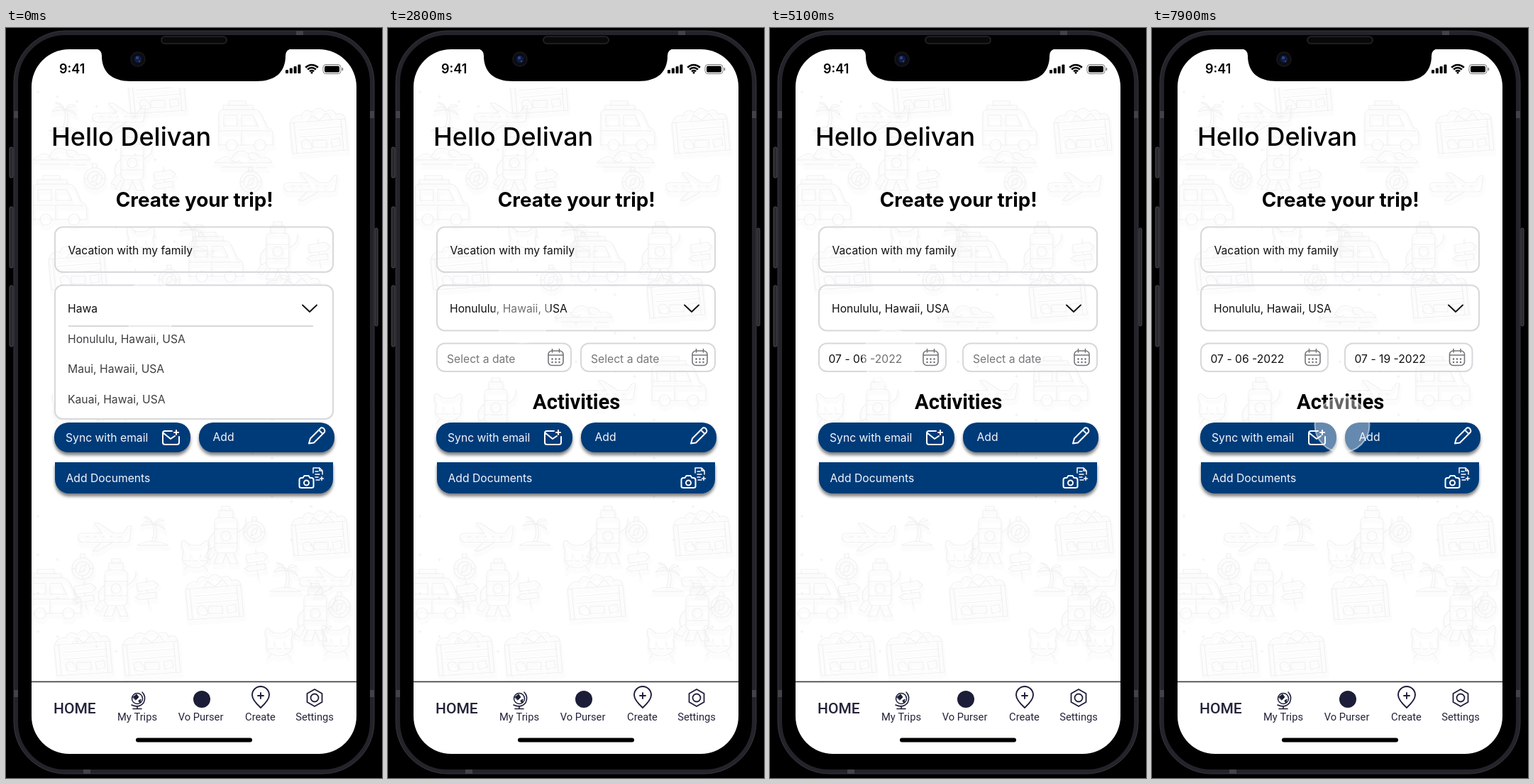
An HTML page with a canvas that plays this animation: 530 px wide and 1057 px high, repeating every 8 s.

```html
<!DOCTYPE html>
<html lang="en">
<head>
<meta charset="utf-8">
<title>Create your trip</title>
<style>
html, body { margin: 0; width: 530px; height: 1057px; overflow: hidden; background: #000; }
canvas { display: block; }
</style>
</head>
<body>
<canvas id="stage" width="530" height="1057"></canvas>
<script>
const W = 530, H = 1057, LOOP = 8000, STEP = 100;
const BLUE = '#003b79', NAVY = '#1c1d38', BORDER = '#d8d8dc';
let ctx;

const clamp = v => Math.min(1, Math.max(0, v));
const mix = (a, b, p) => a + (b - a) * p;
const progress = (t, start, length) => clamp((t - start) / length);
const easeOut = p => 1 - Math.pow(1 - p, 1.7);
const easeInOut = p => p * p * (3 - 2 * p);

function box(x, y, w, h, r, fill, stroke, width = 2) {
  ctx.beginPath();
  ctx.roundRect(x, y, w, h, r);
  paint(fill, stroke, width);
}

function circle(x, y, r, fill, stroke, width = 2) {
  ctx.beginPath();
  ctx.arc(x, y, r, 0, Math.PI * 2);
  paint(fill, stroke, width);
}

function paint(fill, stroke, width) {
  if (fill) { ctx.fillStyle = fill; ctx.fill(); }
  if (stroke) { ctx.strokeStyle = stroke; ctx.lineWidth = width; ctx.stroke(); }
}

function path(d, x, y, stroke, width = 2, fill) {
  ctx.save();
  ctx.translate(x, y);
  ctx.lineCap = ctx.lineJoin = 'round';
  const shape = new Path2D(d);
  if (fill) { ctx.fillStyle = fill; ctx.fill(shape); }
  if (stroke) { ctx.strokeStyle = stroke; ctx.lineWidth = width; ctx.stroke(shape); }
  ctx.restore();
}

function text(s, x, y, color = '#111', font = '15.7px Inter', align = 'left') {
  ctx.font = font + ', sans-serif';
  ctx.textAlign = align;
  ctx.fillStyle = color;
  ctx.fillText(s, x, y);
}

function faded(alpha, draw) {
  if (alpha <= 0) return;
  ctx.save();
  ctx.globalAlpha = alpha;
  draw();
  ctx.restore();
}

// Line drawings of the wallpaper, each around its own centre
const DOODLES = {
  van: 'M-38 25V-18Q-38 -25 -30 -25H12Q20 -25 24 -14L30 0Q38 2 38 10V25H28M-38 25H-28M-12 25H12M-31 -17H-12V-2H-31ZM-6 -17H10L17 -2H-6ZM-38 5H34M-28 25a8 8 0 1 0 16 0a8 8 0 1 0 -16 0M12 25a8 8 0 1 0 16 0a8 8 0 1 0 -16 0M-32 -25V-31H10V-25M-24 -31V-37H0V-31M-6 5V25',
  plane: 'M-36 4Q-38 -4 -30 -4H-2L-14 -18H-7L14 -4H27L34 -14H39L36 6Q35 9 28 9H-28Q-34 9 -36 4ZM-4 9L-16 21H-8L12 9M-26 1H-21M-14 1H-10M-3 1H1M8 1H12M20 1H24',
  bag: 'M-40 -14L38 -20L42 24L-36 29ZM-34 -15L-30 28M32 -19L36 24M-40 -14Q-35 -27 -24 -24Q-20 -36 -8 -29Q0 -40 10 -30Q22 -36 25 -26Q36 -30 38 -20M-28 -4L34 -9M-27 6L35 1M-15 -16L-9 -25L2 -18L12 -28L20 -19M-8 10H12V20H-8ZM-24 13q8 -9 14 2t-12 6zM18 10l12 -3l2 10l-12 3z',
  hiker: 'M-16 -18Q-17 -26 -9 -26H9Q17 -26 16 -18V16Q16 24 8 24H-8Q-16 24 -16 16ZM-10 -26V-36H10V-26M-6 -36V-42H6V-36M-16 -10H16M-16 10H16M-7 0a7 7 0 1 0 14 0a7 7 0 1 0 -14 0M-16 -5Q-29 5 -23 19L-16 15M16 -5Q30 -12 28 -25M-11 24L-17 39H-5L0 25M0 25L6 39H17L11 24M-24 20l-6 9l8 4l6 -9',
  globe: 'M-15 0a15 15 0 1 0 30 0a15 15 0 1 0 -30 0M-10 0a10 10 0 1 0 20 0a10 10 0 1 0 -20 0M-3 -15V-21H3V-15M5 -6L2 3L-5 6L-2 -3ZM-15 0H-11M11 0H15M0 11V15',
  palm: 'M-22 19Q0 8 22 19ZM-2 14Q4 1 0 -10M3 13Q8 0 3 -10M1 -10Q-7 -20 -17 -8Q-7 -12 1 -10Q-4 -23 -13 -21Q-4 -18 1 -10Q8 -23 16 -16Q8 -16 1 -10Q13 -13 17 -3Q10 -9 1 -10',
  sign: 'M-14 -9L10 -13L17 -7L12 -1L-12 2ZM-10 6L13 3L14 11L-9 14L-16 10ZM0 -12V-18M1 0V5M2 13L4 23',
  isle: 'M-40 8Q-26 -5 -16 2Q-8 -15 8 -5Q17 -9 25 1Q36 -2 41 8ZM-30 14H12M18 15H34M-18 3Q-10 10 -4 4M8 -4Q7 5 18 4',
  cat: 'M-17 -4Q-23 -19 -16 -20L-7 -13H7L16 -20Q22 -18 17 -4Q22 12 9 17Q0 21 -9 17Q-22 12 -17 -4ZM-7 -1v4M7 -1v4M-3 8Q0 11 3 8M-16 9L-7 9M16 9L7 9M-12 17L-17 23M12 17L17 23'
};
const PLACES = {
  van: [[338, 140], [76, 245], [296, 325], [68, 800], [410, 500]],
  plane: [[158, 124], [428, 222], [138, 716], [450, 778], [310, 515]],
  bag: [[440, 148], [212, 92], [100, 340], [405, 380], [442, 715], [293, 805], [108, 884], [204, 884]],
  hiker: [[178, 190], [383, 315], [310, 716], [436, 825], [155, 790], [152, 535]],
  globe: [[108, 762], [350, 710], [470, 816], [125, 212], [345, 217], [230, 355]],
  palm: [[207, 710], [394, 775], [82, 126], [262, 295]],
  sign: [[198, 792], [352, 752], [110, 796], [222, 213], [440, 315]],
  isle: [[334, 182], [78, 178], [275, 400]],
  cat: [[267, 742], [385, 866], [465, 862], [190, 300], [85, 535]]
};

function drawWallpaper() {
  for (const [kind, spots] of Object.entries(PLACES))
    for (const [x, y] of spots) {
      path(DOODLES[kind], x + 1, y + 5, 'rgba(0,0,0,.012)', 6);
      path(DOODLES[kind], x, y, '#f0f0f1', 1.1);
    }
  for (let i = 0; i < 70; i++) {
    const x = 45 + (i * 137.5) % 440, y = 90 + (i * 251.3) % 815;
    path('M-2 0H2M0 -2V2', x, y, '#f1f1f2', 1);
  }
}

function drawPhone() {
  ctx.fillStyle = '#000';
  ctx.fillRect(0, 0, W, H);
  for (const [y, h] of [[168, 43], [252, 86], [363, 86]]) box(5, y, 5, h, 2, '#29292d', '#4a4a50', 1);
  box(520, 282, 4, 138, 2, '#29292d', '#4a4a50', 1);
  box(14, 7, 502, 1041, 70, '#000', '#24232a', 6);
  box(11, 4, 508, 1047, 73, null, '#38373e', 1);
  ctx.fillStyle = '#434249';
  for (const y of [117, 933]) {
    ctx.fillRect(11, y, 6, 10);
    ctx.fillRect(513, y, 6, 10);
  }
  ctx.fillRect(409, 4, 10, 6);
  ctx.fillRect(109, 1045, 10, 6);
  box(36, 30, 458, 993, 53, '#fff');
  box(219, 12, 92, 10, 5, '#09090a', '#27272a', 1.5);
}

function drawNotch() {
  path('M125 29Q135 30 135 39C135 62 149 75 176 75H353C380 75 394 62 394 39Q394 30 404 29Z', 0, 0, null, 0, '#000');
  circle(186, 44, 10, '#0c0d13', '#17181e', 1.5);
  circle(186, 44, 5, '#121c49');
  circle(185, 42, 2.2, '#2d4580');
  circle(188, 47, 1.3, '#284d73');
}

function drawStatus() {
  text('9:41', 75, 64, '#000', '600 18px Inter');
  for (let i = 0; i < 4; i++) {
    const h = 5 + i * 2.5;
    box(394 + i * 5.8, 64 - h, 4, h, 1, '#000');
  }
  for (const r of [4, 8, 12]) {
    ctx.beginPath();
    ctx.arc(431, 64, r, -Math.PI * .76, -Math.PI * .24);
    paint(null, '#000', 2.7);
  }
  circle(431, 63, 1.5, '#000');
  box(447, 51.5, 25, 13, 4, null, '#777', 1);
  box(449, 53.5, 21, 9, 2, '#000');
  box(473.5, 56, 1.7, 4, 1, '#777');
}

function drawNav() {
  ctx.fillStyle = '#fff';
  ctx.fillRect(36, 921, 458, 40);
  ctx.fillStyle = '#434347';
  ctx.fillRect(36, 920.5, 458, 1.7);
  text('HOME', 67, 966, '#24243a', '500 21px Roboto');
  [['My Trips', 185], ['Vo Purser', 274.5], ['Create', 358.5], ['Settings', 435]]
    .forEach(([label, x]) => text(label, x, 976, '#24243a', '14.7px Roboto', 'center'));

  circle(185, 945, 7.5, null, NAVY, 1.5);
  path('M-6 -2L-1 -6L2 -2L-2 2ZM2 3L5 1L4 6Z', 185, 945, NAVY, 1, NAVY);
  path('M7 -9Q13 -3 9 6Q2 14 -8 9M0 11V14M-6 14.5H6', 185, 945, NAVY, 1.6);
  circle(276, 946, 12, NAVY);
  path('M0 15Q-12 4 -12 -3A12 12 0 0 1 12 -3Q12 4 0 15ZM-4 -2H4M0 -6V2', 359, 943, NAVY, 1.9);
  path('M0 -12L10.5 -6V6L0 12L-10.5 6V-6Z', 435, 944, NAVY, 1.8);
  circle(435, 944, 5.5, null, NAVY, 1.8);
  box(183, 1000.5, 164, 6, 3, '#000');
}

function drawButton(x, y, w, h, radii, label, textX, baseline) {
  ctx.save();
  ctx.shadowColor = 'rgba(0,0,0,.5)';
  ctx.shadowBlur = 4;
  ctx.shadowOffsetY = 4;
  box(x, y, w, h, radii, BLUE);
  ctx.restore();
  text(label, textX, baseline, '#f4f6fa');
}

function drawButtons() {
  drawButton(68, 556, 192, 42, 20, 'Sync with email', 84, 582.7);
  drawButton(272, 556, 191, 42, 20, 'Add', 291.5, 582);
  drawButton(69, 612, 392, 44, [0, 0, 20, 20], 'Add Documents', 84.5, 640.3);
  path('M2 -9H-8Q-11 -9 -11 -6V7Q-11 10 -8 10H9Q12 10 12 7V-1M-10 -6L0 2L6 -2M8 -10V-4M5 -7H11', 232, 577, '#fff', 2);
  path('M-11 11L-9 4L6 -11Q8 -12 10 -10L11 -8Q12 -6 11 -5L-4 10ZM3 -8L8 -3', 438, 574.5, '#fff', 2);
  path('M-7 -6H-5L-3 -9H3L5 -6H7Q10 -6 10 -3V6Q10 8 7 8H-7Q-10 8 -10 6V-3Q-10 -6 -7 -6Z', 423.5, 640, '#fff', 2);
  circle(423.5, 641, 3.5, null, '#fff', 2);
  path('M-7 -2V-9H2L6 -5V0M2 -9V-5H6M-4 -4H0M-4 0H2M-4 4H0M-3 8H2M5 3.5V8.5M2.5 6H7.5', 440, 629, '#fff', 1.5);
}

function drawCalendar(x, y) {
  box(x - 10.5, y - 9.5, 21, 20.5, 5, null, '#757579', 1.6);
  path('M-10 -3.5H10M-5 -12V-7.5M5 -12V-7.5', x, y, '#757579', 1.6);
  for (let i = 0; i < 6; i++) circle(x - 5 + (i % 3) * 5, y + 2 + Math.floor(i / 3) * 4.5, 1.2, '#68686c');
}

function drawDate(x, endWidth, value, p) {
  const w = mix(189, endWidth, p);
  box(x, 444.5, w, 39.5, 11, null, BORDER);
  faded(1 - p, () => text('Select a date', x + 14, 471.5, '#77777b'));
  faded(p, () => text(value, x + 13.5, 471.5));
  drawCalendar(x + w - 21.5, 464.5);
}

function drawPlace(p) {
  const h = mix(188.5, 64, p);
  faded(1 - p, () => box(69, 362.5, 392, h, 11, '#fff'));
  box(69, 362.5, 392, h, 11, null, BORDER);
  faded(p, () => text('Honululu, Hawaii, USA', 87, 400.5));
  faded(1 - p, () => {
    text('Hawa', 87, 400.5);
    ctx.fillStyle = '#d4d4d7';
    ctx.fillRect(88, 419.2, 345, 1.8);
    ['Honululu, Hawaii, USA', 'Maui, Hawaii, USA', 'Kauai, Hawai, USA']
      .forEach((s, i) => text(s, 87, 443.5 + i * 42.7, '#3e3e42'));
  });
  path('M-10 -4.5L0 5L10 -4.5', 428, 395, '#111', 1.9);
}

// Pointer stops: time, x, y
const STOPS = [
  [0, 203, 395], [1200, 196, 400], [2300, 189, 405], [3250, 190, 405], [4000, 154, 463],
  [4950, 154, 463], [5750, 325, 465], [6000, 325, 465], [6500, 339, 462],
  [7000, 339, 482], [7500, 339, 482], [7800, 217, 530], [7900, 268, 559.5]
];
const CLICKS = [2100, 4200, 6100];

function pointerAt(t) {
  const i = STOPS.findIndex(s => s[0] > t);
  if (i < 0) return STOPS.at(-1).slice(1);
  const [a, b] = [STOPS[i - 1], STOPS[i]];
  const p = easeInOut(progress(t, a[0], b[0] - a[0]));
  return [mix(a[1], b[1], p), mix(a[2], b[2], p)];
}

function drawPointer(t) {
  const [x, y] = pointerAt(t);
  circle(x, y, 38.5, 'rgba(255,255,255,.4)', 'rgba(255,255,255,.5)', 2);
  const start = CLICKS.find(c => t >= c && t < c + 200);
  if (start === undefined) return;
  const r = mix(62, 103.5, progress(t, start, 100));
  circle(x + .5, y - .7, r, null, '#fff', 6);
  circle(x + .5, y - .7, r, null, '#111', 2.4);
}

function makeBackdrop() {
  const layer = document.createElement('canvas');
  layer.width = W;
  layer.height = H;
  ctx = layer.getContext('2d');
  drawPhone();
  ctx.save();
  ctx.beginPath();
  ctx.rect(36, 84, 458, 837);
  ctx.clip();
  drawWallpaper();
  ctx.restore();
  drawNotch();
  drawStatus();
  drawNav();
  text('Hello Delivan', 64, 166, '#000', '500 36px Inter');
  text('Create your trip!', 265.7, 252, '#000', '700 27.8px Inter', 'center');
  box(69, 280.5, 392, 63.5, 11, null, BORDER);
  text('Vacation with my family', 87.5, 318.5);
  return layer;
}

const backdrop = makeBackdrop();
const stage = document.getElementById('stage').getContext('2d');

function render(now) {
  const t = Math.floor((now % LOOP) / STEP) * STEP;
  const switched = start => easeOut(progress(t, start, 300));
  ctx = stage;
  ctx.drawImage(backdrop, 0, 0);
  drawDate(69, 179, '07 - 06 -2022', switched(4650));
  drawDate(272, 179.5, '07 - 19 -2022', switched(6475));
  text('Activities', 265.7, 537, '#000', '700 29.2px Roboto', 'center');
  drawPlace(switched(2475));
  drawButtons();
  drawPointer(t);
}

const began = performance.now();
function tick() {
  render(performance.now() - began);
  requestAnimationFrame(tick);
}
tick();
</script>
</body>
</html>
```
